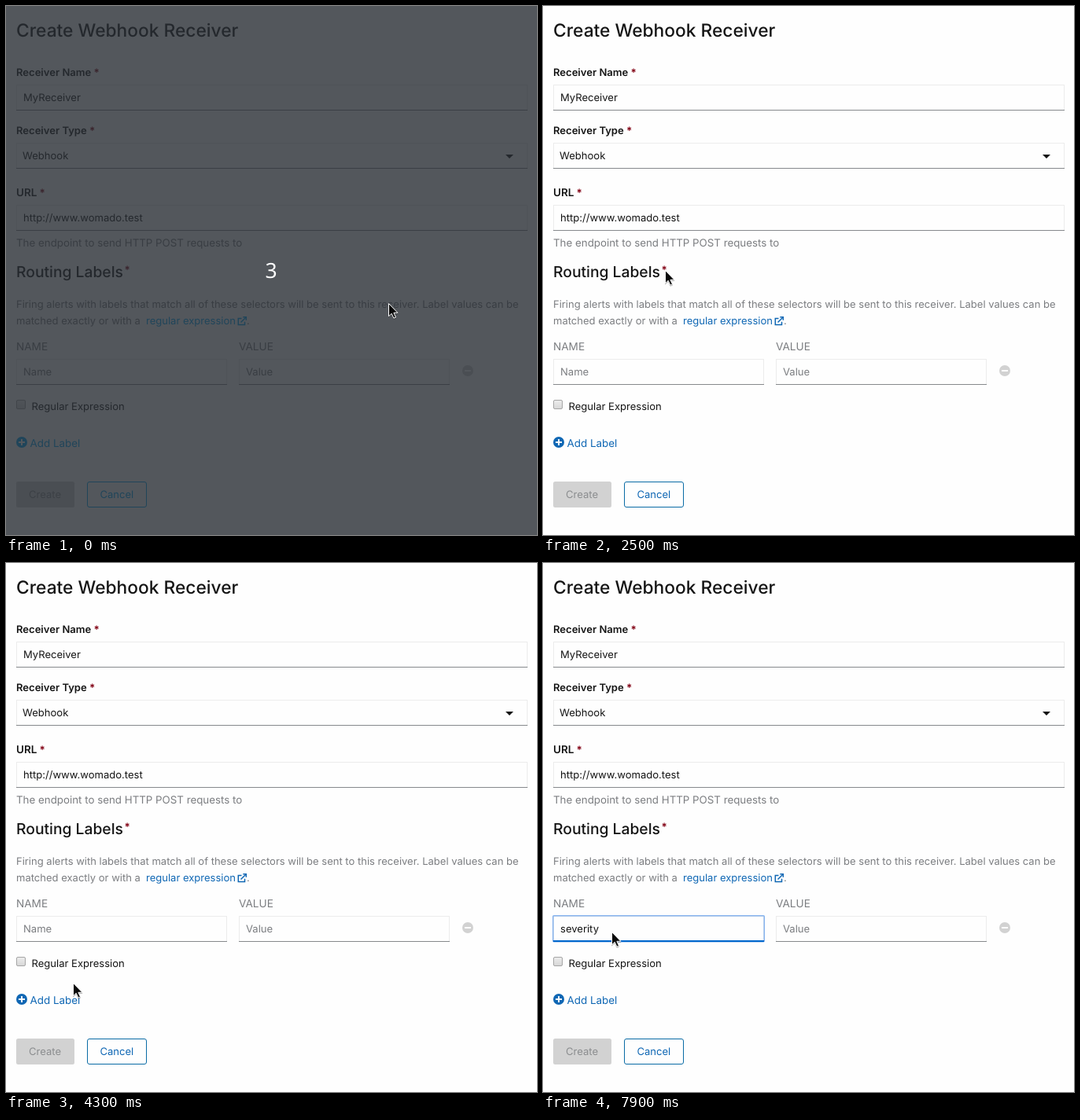
Write an HTML page that moves like this. It is 675 by 673 pixels and loops after 8000 ms.

```html
<!DOCTYPE html>
<html lang="en">
<head>
<meta charset="utf-8">
<title>Webhook receiver form</title>
<style>
  html, body { margin: 0; width: 100%; height: 100%; overflow: hidden; background: #fefefe; }
  svg { display: block; width: 100%; height: 100%; --link: #0f67b4; --edge: #0a6ba5; }
  svg.veiled { --link: #00a5f5; --edge: #00a5f5; }
  text { font: 13.06px Inter, "Noto Sans", sans-serif; fill: #151515; text-rendering: geometricPrecision; white-space: pre; }
  .title { font-size: 22.75px; font-weight: 500; }
  .section { font-size: 19.3px; font-weight: 500; }
  .label { font-weight: 600; }
  .star { font-weight: 700; fill: #85081a; }
  .hint { fill: #7b7d80; }
  .para { font-size: 13.02px; }
  .caps { font-size: 13.6px; }
  .link { fill: var(--link); }
  .line { fill: none; stroke: var(--link); }
  .edge { fill: none; stroke: var(--edge); }
  .hover { --link: #004080; }
  .hover text { text-decoration: underline; }
  .count { font: 26.5px "Noto Sans", "Open Sans", sans-serif; fill: #fff; text-anchor: middle; }
</style>
</head>
<body>
<svg id="stage" viewBox="0 0 675 673">
  <rect width="675" height="673" fill="#fefefe"/>
  <g id="fields"></g>

  <text class="title" x="13" y="39">Create Webhook Receiver</text>

  <text class="label" x="13" y="89">Receiver Name</text>
  <text class="star" x="113.500" y="89" text-anchor="start" dx="-2">*</text>
  <text x="22" y="121">MyReceiver</text>

  <text class="label" x="13" y="163">Receiver Type</text>
  <text class="star" x="106" y="163">*</text>
  <text x="21" y="195">Webhook</text>
  <path d="M635 189h10l-5 5z" fill="#151515"/>

  <text class="label" x="13" y="242" style="font-size:13.5px">URL</text>
  <text class="star" x="42.500" y="242">*</text>
  <text x="22" y="274">http://www.womado.test</text>
  <text class="hint" x="13" y="306" style="font-size:13.34px">The endpoint to send HTTP POST requests to</text>

  <text class="section" x="13" y="345">Routing Labels</text>
  <text class="star" x="150.500" y="340">*</text>
  <text class="hint para" x="13" y="384">Firing alerts with labels that match all of these selectors will be sent to this receiver. Label values can be</text>
  <text class="hint para" x="13" y="405">matched exactly or with a</text>
  <text class="link para" x="178" y="405">regular expression</text>
  <g class="line" stroke-width="1.500">
    <path d="M299.500 397.500h-4.200v8h8.200v-3.700M298.500 402.500l6.300-6.300"/>
    <path d="M301.300 395.800h4v4"/>
  </g>
  <text class="hint para" x="306" y="405">.</text>

  <text class="hint caps" x="13" y="438">NAME</text>
  <text class="hint caps" x="296" y="438">VALUE</text>
  <text id="name" x="22" y="470"></text>
  <text class="hint" x="305" y="470">Value</text>
  <circle cx="587" cy="464" r="7" fill="#d2d2d2"/>
  <path d="M583 464h8" stroke="#fefefe" stroke-width="2"/>

  <linearGradient id="shade" x2="0" y2="1">
    <stop stop-color="#ededed"/><stop offset="1" stop-color="#d6d6d6"/>
  </linearGradient>
  <rect x="13.500" y="501.500" width="11" height="11" rx="1.500" fill="url(#shade)" stroke="#a6a6a6"/>
  <text x="32.500" y="514">Regular Expression</text>

  <g id="add">
    <circle class="link" cx="20" cy="555" r="7"/>
    <path d="M16 555h8M20 551v8" stroke="#fefefe" stroke-width="2"/>
    <text class="link" x="30.500" y="561" style="font-size:13.4px">Add Label</text>
  </g>

  <rect x="13" y="605" width="74" height="33" rx="2.500" fill="#d2d2d2"/>
  <text x="29" y="626" style="fill:#8b8d8f">Create</text>
  <rect class="edge" x="103.500" y="605.500" width="75" height="32" rx="2.500"/>
  <text class="link" x="119.500" y="626">Cancel</text>

  <path id="hoverLine" d="M13 481.500h268" stroke="#06c"/>
  <g id="focus">
    <rect x="12.750" y="448.750" width="268.500" height="33" rx="1" fill="none" stroke="#86b3ee" stroke-width="1.500"/>
    <path d="M13 481h268" stroke="#06c" stroke-width="2"/>
    <path id="caret" d="M.5 456v18" stroke="#111"/>
  </g>

  <g id="veil">
    <rect width="675" height="673" fill="#292e34" opacity=".8"/>
    <text class="count" x="337" y="346">3</text>
  </g>
  <path id="cursor" d="M0 0v16.300l3.700-3.500 2.700 5.900 2.600-1.100-2.600-5.800h5z" fill="#0a0a0a" stroke="#fff" stroke-width="1" stroke-linejoin="round" style="filter:drop-shadow(.5px 1px .6px #0005)"/>
</svg>
<script>
const LOOP = 8000, STEP = 100;
const $ = id => document.getElementById(id);
const show = (id, on) => { $(id).style.display = on ? '' : 'none'; };
const smooth = p => p * p * (3 - 2 * p);
const easeIn = p => p * p * p;

// x, y, width of each input box
const boxes = [[13, 100, 650], [13, 174, 650], [13, 253, 650], [13, 449, 268], [296, 449, 268]];
$('fields').innerHTML = boxes.map(([x, y, w]) =>
  `<rect x="${x + .5}" y="${y + .5}" width="${w - 1}" height="32" fill="#fefefe" stroke="#ececec"/>
   <path d="M${x} ${y + 32.5}h${w}" stroke="#86898c"/>`).join('');

// start time, steps, x, y, easing
const moves = [
  [500, 1, 277, 376, smooth],
  [700, 7, 155, 337, smooth],
  [1600, 1, 155, 335, smooth],
  [2500, 3, 155, 358, easeIn],
  [2900, 7, 81, 625, smooth],
  [4000, 7, 87, 475, smooth],
  [4800, 2, 87, 468, smooth],
  [7900, 1, 87, 469, smooth]
];
const typing = [[6500, 's'], [6700, 'sev'], [6900, 'sever'], [7000, 'severity']];

function pointerAt(t) {
  let x = 486, y = 378;
  for (const [start, steps, toX, toY, ease] of moves) {
    if (t < start) break;
    const done = Math.floor((t - start) / STEP) + 1;
    const p = ease(Math.min(1, done / steps));
    x += (toX - x) * p;
    y += (toY - y) * p;
  }
  return [Math.round(x), Math.round(y)];
}

function draw(t) {
  const [x, y] = pointerAt(t);
  $('cursor').setAttribute('transform', `translate(${x + .5} ${y + .5})`);

  const veiled = t < 400;
  show('veil', veiled);
  $('stage').classList.toggle('veiled', veiled);

  const overAdd = x > 13 && x < 100 && y > 544 && y < 572;
  $('add').setAttribute('class', overAdd ? 'hover' : '');

  const focused = t >= 4800;
  const overName = x > 13 && x < 281 && y > 448 && y < 482;
  show('hoverLine', overName && !focused);
  show('focus', focused);

  const typed = typing.reduce((s, [start, text]) => t >= start ? text : s, '');
  const name = $('name');
  name.textContent = typed || 'Name';
  name.setAttribute('class', typed ? '' : 'hint');
  const width = typed ? Math.round(name.getComputedTextLength()) : 0;
  $('caret').setAttribute('transform', `translate(${22 + width} 0)`);
  show('caret', t < 7500);
}

const begin = performance.now();
function tick() {
  draw((performance.now() - begin) % LOOP);
  requestAnimationFrame(tick);
}
tick();
</script>
</body>
</html>
```
